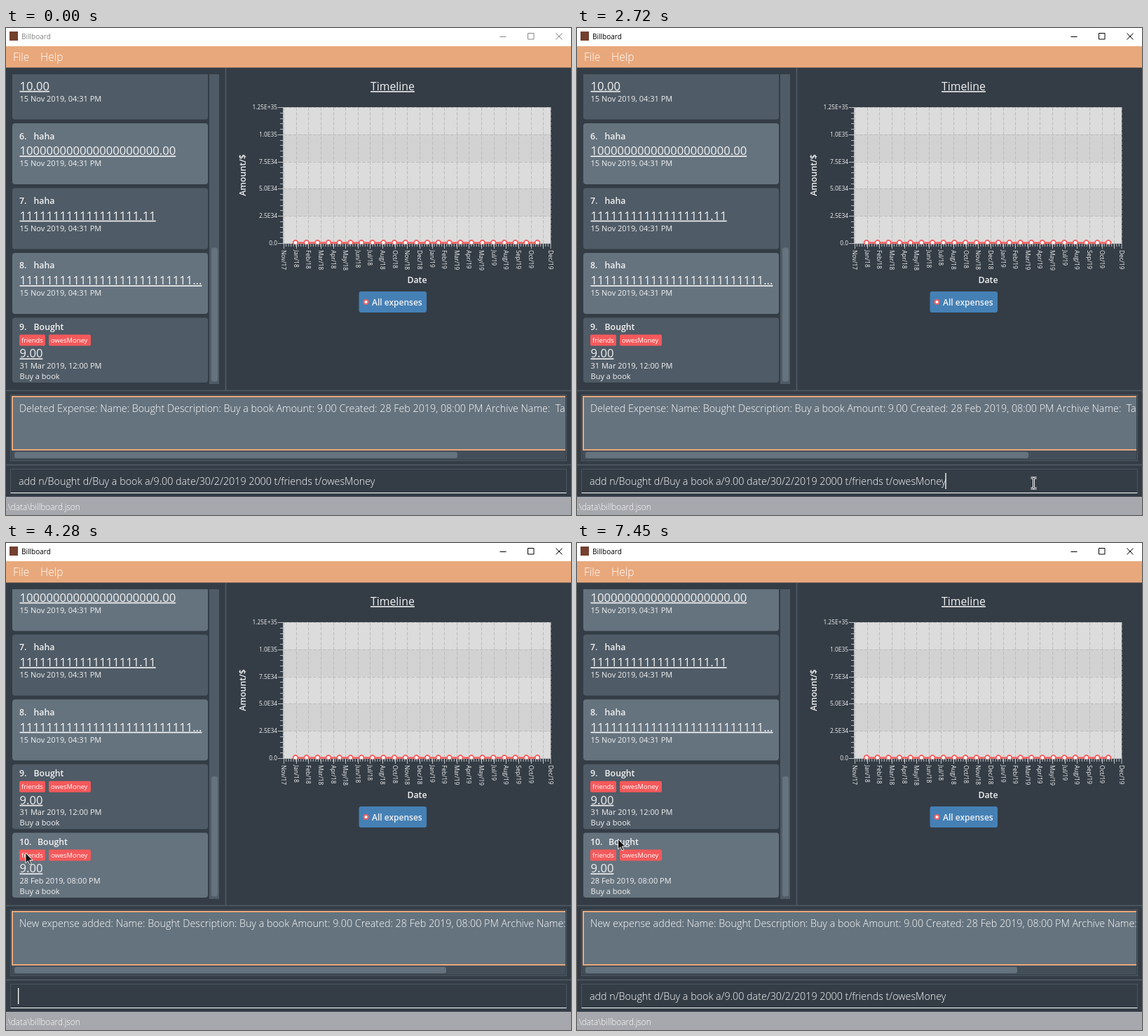
An HTML page that plays this animation: 806x695 px, repeating every 7.99 s.

```html
<!DOCTYPE html>
<html lang="en">
<head>
<meta charset="utf-8">
<title>Billboard</title>
<style>
html, body { margin: 0; width: 100%; height: 100%; overflow: hidden; background: #343d46; }
svg { display: block; font-family: "Open Sans", "Noto Sans", sans-serif; }
text { fill: #f2f2f2; white-space: pre; }
.light { font-weight: 300; fill: #fff; }
.menu { font-size: 15.5px; }
.field { font-size: 14.3px; }
.bold { font-weight: 600; font-size: 12.3px; }
.amount { font-size: 16.6px; text-decoration: underline; }
.small { font-size: 11px; }
.tag { font-size: 9.4px; fill: #fff; }
.axis { font-size: 8.4px; }
.mid { text-anchor: middle; }
.end { text-anchor: end; }
</style>
</head>
<body>
<svg id="stage" width="806" height="695" viewBox="0 0 806 695"></svg>
<script>
const DURATION = 7990;
const COMMAND = 'add n/Bought d/Buy a book a/9.00 date/30/2/2019 2000 t/friends t/owesMoney';
const DETAILS = 'Name: Bought Description: Buy a book Amount: 9.00 Created: 28 Feb 2019, 08:00 PM Archive Name:  Tags:';
const PLOT = { x: 396, y: 113, w: 381, h: 194 };
const BASE = 306.5;
const RED = '#fa5f5f';

const text = (x, y, cls, s, extra = '') => `<text x="${x}" y="${y}" class="${cls}" ${extra}>${s}</text>`;
const rect = (x, y, w, h, fill, r = 0, extra = '') =>
  `<rect x="${x}" y="${y}" width="${w}" height="${h}" fill="${fill}" rx="${r}" ${extra}/>`;
const path = (d, stroke, width = 1, extra = '') =>
  `<path d="${d}" fill="none" stroke="${stroke}" stroke-width="${width}" ${extra}/>`;
const dot = (x, y, r = 3.4) =>
  `<circle cx="${x}" cy="${y}" r="${r}" fill="#fff" stroke="${RED}" stroke-width="2"/>`;

// Expense list
function card(no, name, top, amount, date, tagged) {
  const rows = tagged ? [17.5, 57, 72.5, 87.5] : [22.5, 45.3, 61.3];
  const [nameY, amountY, dateY, noteY] = rows.map(r => top + r);
  let s = rect(9, top, 279, tagged ? 92.5 : 87, no % 2 ? '#4f5b66' : '#65737e', 4);
  s += text(19, nameY, 'bold', no + '.') + text(no > 9 ? 45 : 39.5, nameY, 'bold', name);
  s += text(19.5, amountY, 'amount', amount) + text(19.5, dateY, 'small', date);
  if (tagged) {
    s += rect(19, top + 24, 37, 16, '#f4595b', 2) + text(22, top + 35.2, 'tag', 'friends');
    s += rect(61, top + 24, 60, 16, '#f4595b', 2) + text(64, top + 35.2, 'tag', 'owesMoney');
    s += text(19.5, noteY, 'small', 'Buy a book');
  }
  return s;
}

function cards() {
  const day = '15 Nov 2019, 04:31 PM';
  return card(5, 'haha', 43.5, '10.00', day)
    + card(6, 'haha', 136, '1' + '0'.repeat(20) + '.00', day)
    + card(7, 'haha', 228.4, '1'.repeat(18) + '.11', day)
    + card(8, 'haha', 320.9, '1'.repeat(26) + '...', day)
    + card(9, 'Bought', 413.4, '9.00', '31 Mar 2019, 12:00 PM', true)
    + card(10, 'Bought', 511, '9.00', '28 Feb 2019, 08:00 PM', true);
}

// Axes, bands and grid
function chart() {
  const { x, y, w, h } = PLOT, right = x + w, bottom = y + h, row = h / 5, col = 17.63;
  const months = ('Nov/17 Jan/18 Feb/18 Mar/18 Apr/18 May/18 Jun/18 Jul/18 Aug/18 Oct/18 Nov/18 Dec/18 ' +
    'Jan/19 Feb/19 Mar/19 Apr/19 May/19 Jul/19 Aug/19 Sep/19 Oct/19').split(' ');
  let s = rect(x, y, w, h, '#dcdcdc') + rect(x, y + row, w, row, '#d2d2d2') + rect(x, y + 3 * row, w, row, '#d2d2d2');
  let grid = '', ticks = `M${x - .5} ${y}V${bottom + .5}H${right}`;
  ['1.25E+35', '1.0E35', '7.5E34', '5.0E34', '2.5E34', '0.0'].forEach((label, i) => {
    const ty = Math.round(y + i * row) + .5;
    if (i < 5) grid += `M${x} ${ty}H${right}`;
    ticks += `M${x - 8} ${ty}H${x}`;
    s += text(387, ty + 2.6, 'axis end', label);
  });
  for (let i = 1; i < 25; i++) ticks += `M${x - 5} ${Math.round(y + i * row / 5) + .5}h5`;
  const column = (cx, label) => {
    grid += `M${cx} ${y}V${bottom}`;
    ticks += `M${cx} ${bottom}v8`;
    if (label) s += text(0, 0, 'axis', label, `transform="translate(${cx - 3.2} 317) rotate(90)"`);
  };
  for (let i = 0; i < 22; i++) column(Math.round(x + i * col) + .5, months[i]);
  column(right, 'Dec/19');
  for (let i = 1; i < 108; i++) ticks += `M${x + i * col / 5} ${bottom}v5`;
  s += path(grid, '#bdbdbd', 1, 'stroke-dasharray="5 2"') + path(ticks, '#c9ccd0', .9);
  s += text(551.5, 89, 'mid', 'Timeline', 'font-size="15.8" text-decoration="underline"');
  s += text(0, 0, 'bold mid', 'Amount/$', 'transform="translate(342 210) rotate(-90)"');
  s += text(586.5, 363.7, 'bold mid', 'Date');
  s += rect(503.5, 376, 96.5, 30, '#4580b5', 3) + dot(513.5, 391, 3) + text(522, 395.5, 'bold', 'All expenses', 'style="font-size:12px"');
  return s;
}

document.getElementById('stage').innerHTML = `
<clipPath id="listClip"><rect x="0" y="66" width="300" height="442"/></clipPath>
<clipPath id="plotClip"><rect x="394" y="113" width="384" height="195.5"/></clipPath>
<clipPath id="resultClip"><rect x="8" y="524" width="790" height="80"/></clipPath>
${rect(0, 0, 806, 695, '#343d46')}
${rect(0, 0, 806, 26, '#fff')}${rect(5, 5, 12, 13, '#74402f')}
<g id="frame">${text(22, 16, '', 'Billboard', 'font-size="10" style="fill:currentColor"')}
${path('M704.5 12.5h9M744.5 7.5h8.5v8.5h-8.5zM784.5 7.5l9 9m0-9l-9 9', 'currentColor')}</g>
${rect(0, 26, 806, 30.5, '#e8a87c')}
${text(10, 46.5, 'light menu', 'File')}${text(49, 46.5, 'light menu', 'Help')}
${path('M313.5 57V517M0 517.5H806M0 623.5H806', '#4f5b66', 1.6)}
<g clip-path="url(#listClip)"><g id="list">${cards()}</g></g>
${rect(290, 66, 14, 442, '#4f5b66')}${rect(293, 0, 9, 0, '#65737e', 3, 'id="thumbY"')}
${chart()}
<g clip-path="url(#plotClip)" id="series"></g>
${rect(6.5, 523.5, 793, 94, 'none', 0, 'stroke="#4f5b66"')}
<g clip-path="url(#resultClip)">${rect(9, 526, 800, 76, '#65737e', 0, 'stroke="#e8a87c" stroke-width="2"')}
${text(19, 548, 'light field', '', 'id="result"')}</g>
${rect(8, 603, 790, 13, '#434e59')}${rect(12, 605, 0, 9, '#65737e', 3, 'id="thumbX"')}
${path('M6.5 663V629.5H799.5V663', '#4a5661')}${path('M6.5 663.5H799.5', '#fff')}
${text(18, 652, 'light field', COMMAND, 'id="command"')}
${rect(0, 635, 1.3, 23, '#fff', 0, 'id="caret"')}
${rect(0, 669, 806, 26, '#a7a8ad')}
${text(0, 688, 'light', '.\\data\\billboard.json', 'font-size="11.8"')}
<g id="beam">${['#fff 3', '#222 1'].map(p => path('M-4 -7.5h3l1 1l1-1h3M0-6.5v13M-4 7.5h3l1-1l1 1h3', ...p.split(' '))).join('')}</g>
<path id="arrow" d="M0 0V14.5L3.4 11.4L5.8 16.6L8 15.6L5.7 10.5H10.2z" fill="#111" stroke="#fff" stroke-width=".9"/>`;

const $ = id => document.getElementById(id);
const set = (id, attrs) => { for (const k in attrs) $(id).setAttribute(k, attrs[k]); };
const show = (id, on) => set(id, { visibility: on ? 'visible' : 'hidden' });
const mix = (a, b, k) => a + (b - a) * k;

// Constant speed with short ramps at both ends
function ease(k) {
  k = Math.max(0, Math.min(1, k));
  if (k < .2) return 3.125 * k * k;
  if (k > .8) return 1 - 3.125 * (1 - k) ** 2;
  return 1.25 * k - .125;
}

function drawSeries(t) {
  const moving = t >= 3050;
  const k = moving ? ease((t - 2990) / 700) : 1;
  const pts = Array.from({ length: 23 }, (_, i) => [413 + 15.68 * i, BASE]);
  pts[0][0] = mix(429, 413, k);
  pts[21][1] = mix(223, BASE, k);
  pts[22] = [mix(742, 758, k), mix(300, BASE, k)];
  if (moving && t < 3490) {
    const drop = ease((t - 2990) / 500);
    pts.splice(11, 0, [mix(581, 577.6, drop), mix(222, BASE, drop)]);
  }
  $('series').innerHTML = path('M' + pts.map(p => p.join(' ')).join('L'), RED, 2.6) + pts.map(p => dot(...p)).join('');
}

const blinks = [650, 1190, 1740, 2170, 2720, 3490, 4050, 4590, 5050, 7450];

function drawInput(t) {
  const filled = t < 3050 || t >= 5050;
  let back = 0;
  if (t >= 5480) back = 1;
  if (t >= 5910) back += Math.min(33, Math.round(3.125 * (Math.floor((t - 5910) / 111) + 1)));
  const width = filled ? $('command').getSubStringLength(0, COMMAND.length - back) : 0;
  show('command', filled);
  set('caret', { x: 17 + width });
  show('caret', blinks.filter(b => b <= t).length % 2);
}

// Pointer way points: time, x, y
const route = [[200, 690, 697], [650, 654, 653], [980, 651.5, 649.5], [3050, 651.5, 649.5], [3490, 381, 588],
  [3820, 136, 500], [4200, 22, 446], [4700, 58.5, 422.5], [DURATION, 58.5, 422.5]];

function drawPointer(t) {
  const i = Math.max(1, route.findIndex(p => p[0] > t));
  const [a, b] = [route[i - 1], route[i]];
  const k = (t - a[0]) / (b[0] - a[0]);
  const x = mix(a[1], b[1], k), y = mix(a[2], b[2], k);
  const overText = (y > 526 && y < 602) || (y > 629 && y < 663);
  set('beam', { transform: `translate(${x} ${y})` });
  set('arrow', { transform: `translate(${x} ${y})` });
  show('beam', t >= 200 && overText);
  show('arrow', t >= 200 && !overText);
}

function draw(now) {
  const t = now % DURATION, added = t >= 3050;
  set('frame', { color: t < 650 ? '#858585' : '#000' });
  set('list', { transform: `translate(0 ${added ? -97.6 : 0})` });
  set('thumbY', added ? { y: 333, height: 171.5 } : { y: 313.5, height: 191 });
  set('thumbX', { width: added ? 616 : 632 });
  $('result').textContent = (added ? 'New expense added: ' : 'Deleted Expense: ') + DETAILS;
  drawSeries(t);
  drawInput(t);
  drawPointer(t);
}

const start = performance.now();
function tick() {
  draw(performance.now() - start);
  requestAnimationFrame(tick);
}
tick();
</script>
</body>
</html>
```
